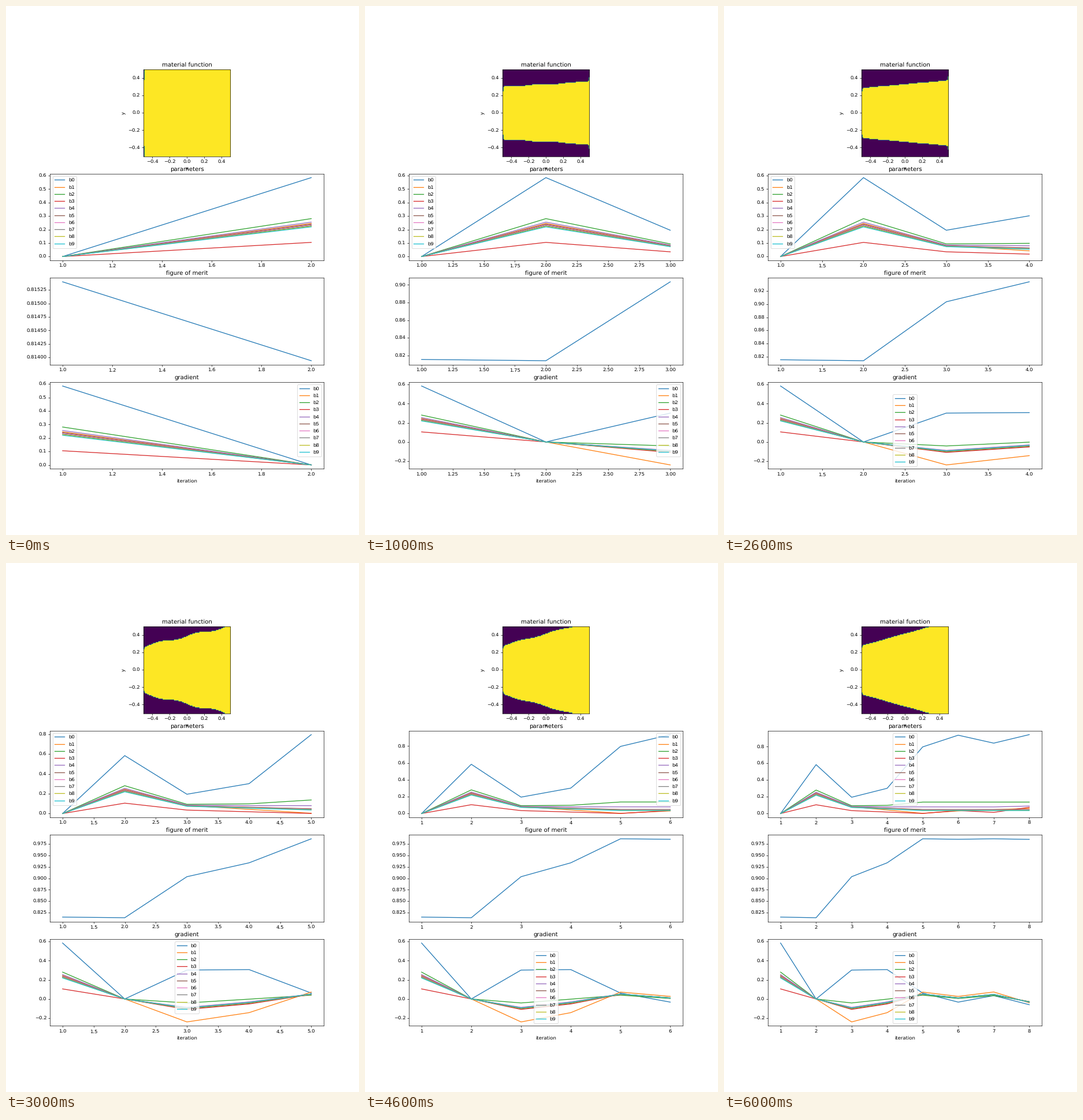
Write a matplotlib script that moves like this. It is 611 px wide and 917 px high and loops after 7 s.

```python
import matplotlib.pyplot as plt
import numpy as np
from matplotlib.animation import FuncAnimation

W, H, DPI = 611, 917, 61.1
STEPS = 7
CELLS = 100

plt.rcParams.update({"font.family": "DejaVu Sans", "font.size": 10,
                     "text.hinting": "none"})

iters = np.arange(1, STEPS + 2)


def param_path(peak, *keys):
    """Rise from zero to the peak, drop to a third, then follow the keys."""
    x, y = zip((1, 0), (2, peak), (3, peak / 3), *keys)
    return np.interp(iters, x, y)


def make_params():
    lead = [
        param_path(.585, (4, .302), (5, .797), (6, .937), (7, .842), (8, .944)),
        param_path(.245, (5, .003), (6, .031), (8, .062)),
        param_path(.281, (4, .098), (5, .137)),
        param_path(.105, (5, .001), (6, .036), (7, .014), (8, .075)),
        param_path(.255, (4, .080), (7, .079), (8, .090)),
    ]
    rest = [param_path(peak, (5, level))
            for peak, level in zip(np.linspace(.24, .22, 5),
                                   np.linspace(.049, .036, 5))]
    return np.array(lead + rest).T


def make_gradient(peaks):
    """b0 and b1 lead; every other gradient is a blend of those two."""
    g0 = np.array([.302, .307, .062, -.033, .035, -.060])
    g1 = np.array([-.240, -.143, .072, .027, .073, -.040])
    blends = [(.40, .18)] + [(.58, w) for w in (.10, .17, .12, .16, .15, .135, .15)]
    tails = [g0, g1] + [a * g1 + b * g0 for a, b in blends]
    return np.vstack([peaks, np.zeros(10), np.transpose(tails)])


params = make_params()
gradient = make_gradient(params[1])
merit = [.8154, .81394, .9035, .9338, .9862, .9852, .9862, .9850]

param_legend = ["upper left"] * 4 + ["upper right"] * 2 + ["upper center"]
grad_legend = ["upper right", "upper right", "lower center", "upper center",
               "lower center", "lower left", "lower center"]

fig, axes = plt.subplots(4, 1, figsize=(W / DPI + 1e-6, H / DPI + 1e-6), dpi=DPI)
fig.subplots_adjust(left=.125, right=.9, bottom=.125, top=.88, hspace=.2)
centres = (np.arange(CELLS) + .5) / CELLS - .5


def half_height(x, b):
    """Half height of the bright region: a sloped, rippled line with end spikes."""
    middle = .317 + .114 * b[0] ** 2 + 25 * b[9] ** 3
    slope = .295 * b[0]
    ripple = .016 * (b[0] - 14 * b[3]) * np.sin(2 * np.pi * x / .42)
    spikes = np.exp((x - .495) / .006) - np.exp(-(x + .495) / .006)
    return middle + slope * x + ripple + .75 * b[9] * spikes


def draw_material(ax, b):
    field = np.abs(centres)[:, None] < half_height(centres, b)
    ax.imshow(field.astype(float), origin="lower", extent=(-.5, .5, -.5, .5),
              cmap="viridis", vmin=0, vmax=1)
    ax.set(title="material function", xlabel="x", ylabel="y")


def draw_family(ax, x, rows, title, loc):
    for i, values in enumerate(rows.T):
        ax.plot(x, values, label=f"b{i}")
    ax.set_title(title)
    ax.legend(loc=loc, labelspacing=.53)


def update(k):
    for ax in axes:
        ax.clear()
    n = k + 2
    x = iters[:n]
    draw_material(axes[0], params[k + 1])
    draw_family(axes[1], x, params[:n], "parameters", param_legend[k])
    axes[2].plot(x, merit[:n])
    axes[2].set_title("figure of merit")
    axes[2].ticklabel_format(useOffset=False)
    draw_family(axes[3], x, gradient[:n], "gradient", grad_legend[k])
    axes[3].set_xlabel("iteration")
    return []


anim = FuncAnimation(fig, update, frames=STEPS, init_func=lambda: update(0),
                     interval=1000, repeat=True, repeat_delay=0)
plt.show()
```
